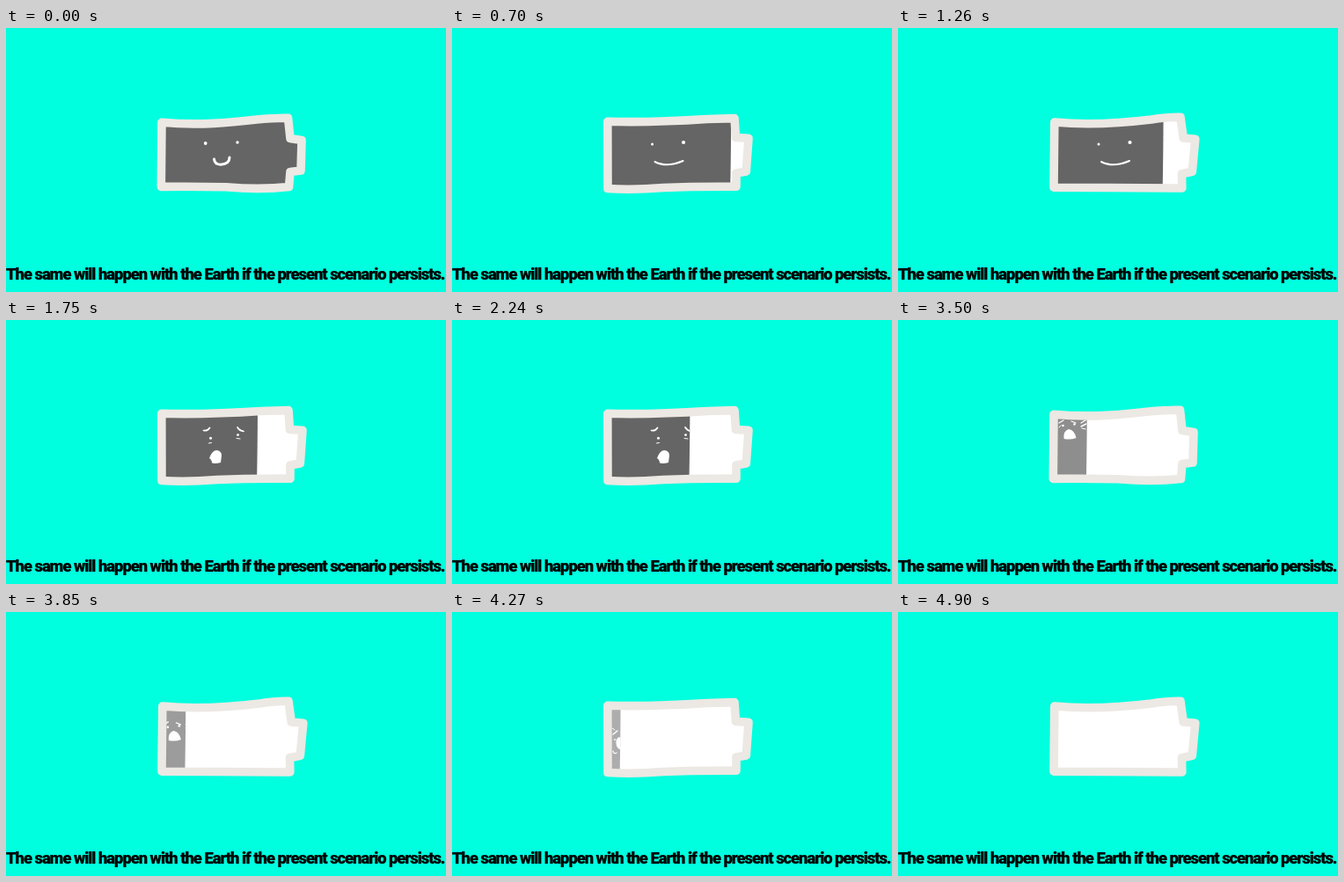
Animation, 500 px wide and 300 px high, one loop 4.97 s. Source, as an HTML page with a canvas:

```html
<!DOCTYPE html>
<html lang="en">
<head>
<meta charset="utf-8">
<title>Draining battery</title>
<style>
  html, body { margin: 0; width: 100%; height: 100%; overflow: hidden; background: #00ffdf; }
  canvas, svg { position: absolute; left: 0; top: 0; width: 500px; height: 300px; }
  text {
    font-weight: 800;
    font-stretch: extra-condensed;
    letter-spacing: -0.055em;
    stroke: #000;
    stroke-width: 0.2px;
  }
</style>
</head>
<body>
<canvas id="stage" width="500" height="300"></canvas>
<svg viewBox="0 0 500 300">
  <text id="caption" x="0" y="285.6">The same will happen with the Earth if the present scenario persists.</text>
</svg>
<script>
const LOOP = 4970, STEP = 70, HOLD = 169;
const canvas = document.getElementById('stage');
const ctx = canvas.getContext('2d');
const ratio = window.devicePixelRatio || 1;
canvas.width = 500 * ratio;
canvas.height = 300 * ratio;
ctx.scale(ratio, ratio);
ctx.lineCap = ctx.lineJoin = 'round';

// Three hand-drawn outlines that alternate to make the line wobble.
const outlines = [
  'M177 107.3C220 111 255 107.5 285 104Q305 102 320.5 102.3L323 125.5L336 127.5L335 162L323 163.5L321.5 180.5Q290 184 250 180.8Q215 180 176.3 180.4Z',
  'M176.8 106.3C220 107.5 260 105.5 290 103.5L321 102.6L322.5 124.5L337 125.2L334.3 163L323 165L323 180.3Q275 180 240 181.5Q205 184.5 177 182.5Z',
  'M177.8 107C220 111 255 108 288 104Q306 101 321 101.3L324.3 125L337.8 126.2L334.3 163.3L322.5 165.8L322.8 182Q275 181.5 240 181.5L177 181.2Z'
].map(d => new Path2D(d));

// time, right edge of the charge, grey level, face centre
const keys = [
  [0, 336, 102, 245, 140],
  [1260, 301, 102, 246, 140],
  [2240, 269.8, 102, 250, 140],
  [2800, 244.3, 102, 202, 143],
  [3500, 214.2, 143, 195, 122],
  [4270, 191, 174, 187, 146],
  [4900, 180, 185, 180, 148]
];

// Expressions: eyes [x, y, r], strokes [path, width], filled mouth
const faces = [
  { eyes: [[226.7, 131, 1.9], [263, 130, 1.7]],
    lines: [['M236.5 149Q237 155.2 244 155.2Q254 154.5 254 147', 3]] },
  { eyes: [[228, 132, 1.5], [263.5, 130, 2.1]],
    lines: [['M231 152Q244 159 263 151', 2]] },
  { eyes: [[234.5, 134.3, 1.5], [265.5, 130.6, 1.4]],
    lines: [['M226.5 125.5Q231 126.5 233.5 122.5', 1.7], ['M265 122Q267 125.5 272 126.5', 1.7],
            ['M232.5 140L235.5 139.5', 1], ['M264 134.5L268 135', 1]],
    mouth: 'M233 157Q236 148.5 241 148Q247 148.5 247 154L246 162Q240 163.5 236 162.5Q236 159 233 157Z' },
  { eyes: [[192, 139, 1.5], [212, 138, 1.2]],
    lines: [['M185 139Q190 137 189.5 132', 1.7], ['M209 130Q212 134 217 132.5', 1.7]],
    mouth: 'M194 153Q195 143 201 141.5Q208 142 210 150Q209 155 203 153Q199 157 194 153Z' },
  { eyes: [[187.5, 120, 1.3], [200.5, 118.5, 1.3]],
    lines: [['M183 117L188 114', 1.3], ['M183 122L185 120', 1], ['M197 115L202 117', 1.2],
            ['M208 117L213 114', 1.4], ['M208 121L214 118', 1.4], ['M209 123L213 124', 1.2]],
    mouth: 'M188.5 135Q187.5 126 194 124Q200.5 125 202.5 134Q196 136.5 188.5 135Z' },
  { eyes: [[185, 145, 0.9]],
    lines: [['M183 139L188 135', 1.6], ['M182 132L185 134', 1], ['M183 158Q184 162 187 160', 1.2]],
    mouth: 'M187 152Q185 144 190 142L194 145L193 156Q189 157 187 152Z' }
].map(f => ({
  eyes: f.eyes,
  lines: f.lines.map(([d, w]) => [new Path2D(d), w]),
  mouth: f.mouth && new Path2D(f.mouth)
}));

function sample(t) {
  let i = 0;
  while (i < keys.length - 2 && t >= keys[i + 1][0]) i++;
  const a = keys[i], b = keys[i + 1];
  const k = Math.min(1, (t - a[0]) / (b[0] - a[0]));
  const [, edge, grey, x, y] = a.map((v, j) => v + (b[j] - v) * k);
  const face = Math.min(faces.length - 1, k < 0.5 ? i : i + 1);
  return { edge, grey, x, y, face };
}

function drawFace({ face, x, y }) {
  const { eyes, lines, mouth } = faces[face];
  ctx.save();
  ctx.translate(x - keys[face][3], y - keys[face][4]);
  ctx.fillStyle = ctx.strokeStyle = '#fff';
  for (const [ex, ey, r] of eyes) {
    ctx.beginPath();
    ctx.arc(ex, ey, r, 0, Math.PI * 2);
    ctx.fill();
  }
  for (const [path, width] of lines) {
    ctx.lineWidth = width;
    ctx.stroke(path);
  }
  if (mouth) ctx.fill(mouth);
  ctx.restore();
}

function draw(t) {
  const state = sample(t);
  const shape = outlines[Math.floor((t + 99) / HOLD) % 3];
  const { edge, grey } = state;

  ctx.fillStyle = '#00ffdf';
  ctx.fillRect(0, 0, 500, 300);
  ctx.fillStyle = '#fff';
  ctx.fill(shape);

  ctx.save();
  ctx.clip(shape);
  ctx.beginPath();
  ctx.moveTo(170, 95);
  ctx.lineTo(edge + 0.6, 95);
  ctx.quadraticCurveTo(edge + 0.5, 145, edge - 0.5, 190);
  ctx.lineTo(170, 190);
  ctx.closePath();
  ctx.clip();
  ctx.fillStyle = `rgb(${grey}, ${grey - 1}, ${grey - 1})`;
  ctx.fillRect(170, 95, 180, 95);
  drawFace(state);
  ctx.restore();

  ctx.strokeStyle = '#ece8e3';
  ctx.lineWidth = 9.6;
  ctx.stroke(shape);
}

// Use the narrowest heavy face available, sized to span the stage.
function setCaption() {
  const text = document.getElementById('caption');
  const fonts = ['Impact', 'Noto Sans', 'Open Sans', 'Roboto', 'Liberation Sans Narrow', 'Liberation Sans'];
  const measure = name => {
    text.style.fontFamily = `"${name}", "Liberation Sans", sans-serif`;
    text.style.fontSize = '20px';
    return text.getComputedTextLength();
  };
  const best = fonts.map(name => [measure(name), name]).sort((a, b) => a[0] - b[0])[0];
  const width = measure(best[1]);
  text.style.fontSize = `${20 * 499 / width}px`;
}

const start = performance.now();
function tick() {
  const t = (performance.now() - start) % LOOP;
  draw(Math.floor(t / STEP) * STEP);
  requestAnimationFrame(tick);
}
setCaption();
tick();
</script>
</body>
</html>
```
